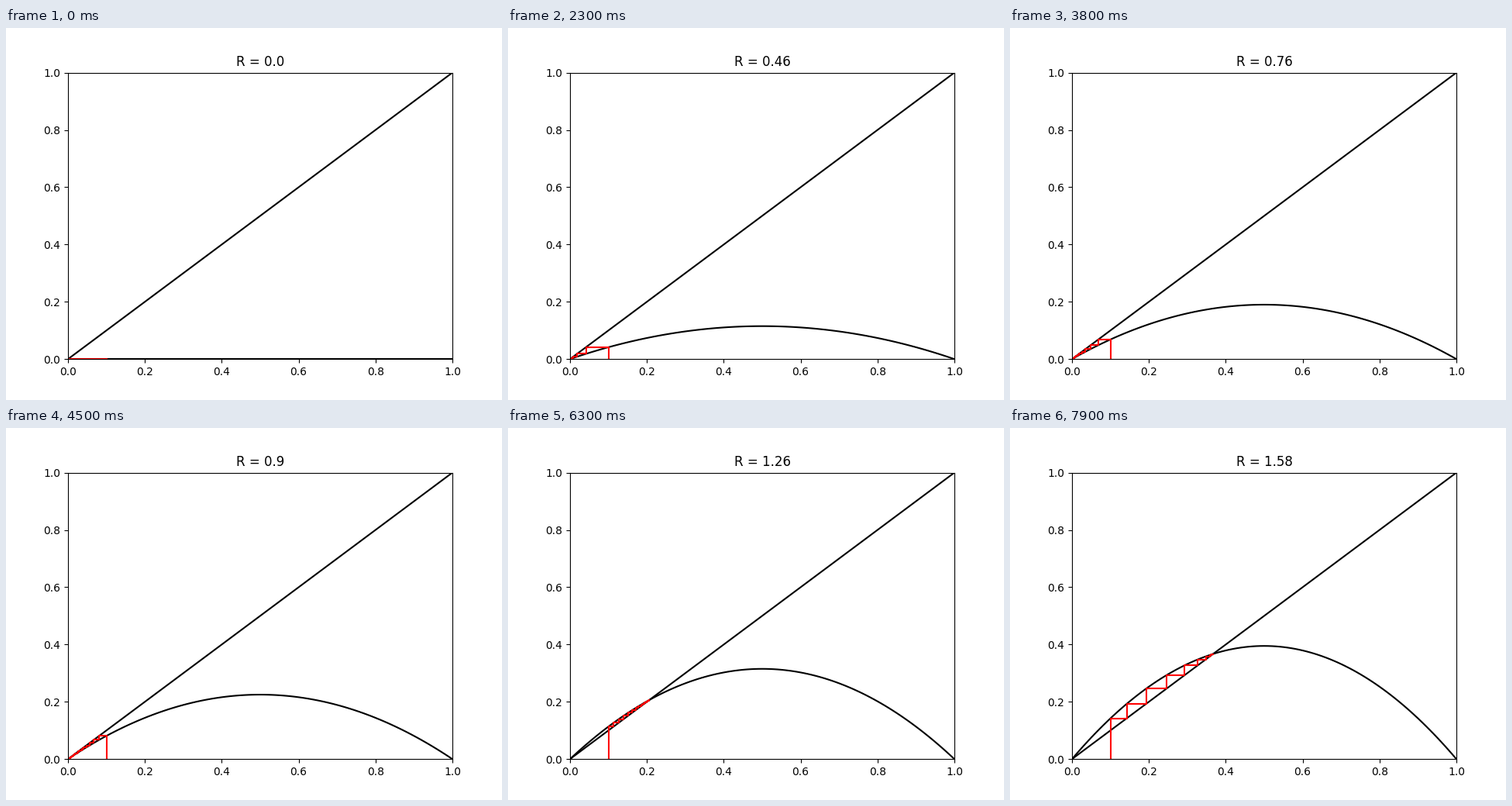
Animation, 640 px wide and 480 px high, one loop 8 s. Source, as a matplotlib script:

```python
import numpy as np
import matplotlib.pyplot as plt
from matplotlib.animation import FuncAnimation

FRAMES = 80
STEPS = 50
X0 = 0.1


def logistic(r, x):
    return r * x * (1 - x)


def cobweb(r):
    """Corner points of the staircase between the parabola and the diagonal."""
    x, xs, ys = X0, [X0], [0.0]
    for _ in range(STEPS):
        y = logistic(r, x)
        xs += [x, y]
        ys += [y, y]
        x = y
    return xs, ys


fig, ax = plt.subplots(figsize=(6.4, 4.8), dpi=100)
ax.set_xlim(0, 1)
ax.set_ylim(0, 1)

grid = np.linspace(0, 1, 101)
ax.plot(grid, grid, color="black")
curve, = ax.plot([], [], color="black")
web, = ax.plot([], [], color="red")
title = ax.set_title("")


def update(i):
    r = i / 50
    curve.set_data(grid, logistic(r, grid))
    web.set_data(*cobweb(r))
    title.set_text(f"R = {r}")
    return curve, web, title


anim = FuncAnimation(fig, update, frames=FRAMES, interval=100,
                     repeat=True, repeat_delay=0, blit=False)
plt.show()
```
